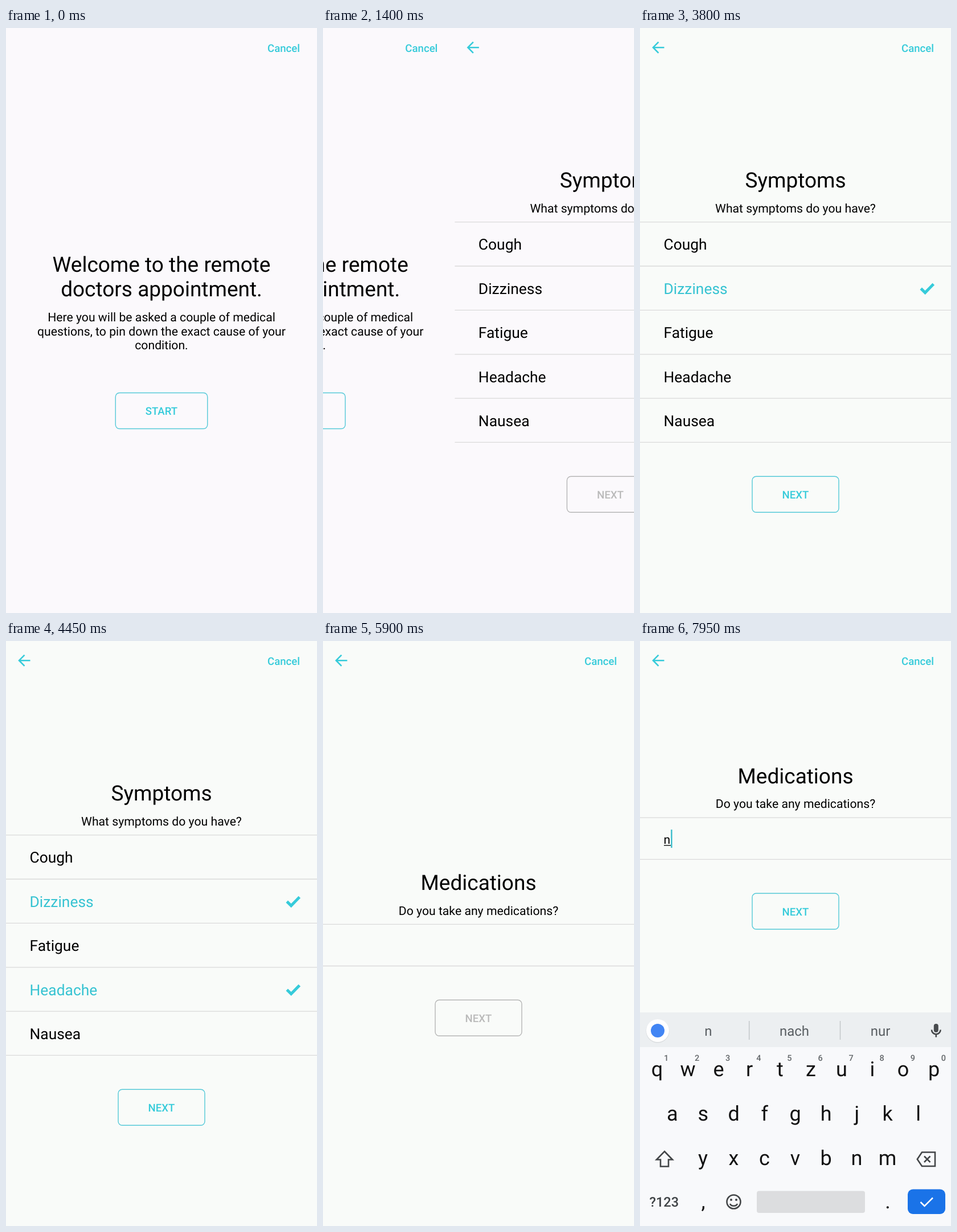
Animation, 546 px wide and 1027 px high, one loop 8000 ms. Source, as an HTML page:

```html
<!DOCTYPE html>
<html lang="en">
<head>
<meta charset="utf-8">
<title>Remote appointment</title>
<style>
  html, body { margin: 0; width: 100%; height: 100%; overflow: hidden; background: #fbf9fc; }
  svg { display: block; width: 100%; height: 100%; font-family: Roboto, "Open Sans", sans-serif; text-rendering: geometricPrecision; }
  .title { font-size: 37px; text-anchor: middle; }
  .sub { font-size: 21.2px; text-anchor: middle; }
  .item { font-size: 26.4px; }
  .bar, .btn text { font-size: 18.6px; font-weight: 500; }
  .bar { fill: #36cbda; }
  .arrow { fill: none; stroke: #36cbda; stroke-width: 2.6; }
  .rule { stroke: #dadada; stroke-width: 1.3; }
  .btn text { fill: #bababa; text-anchor: middle; }
  .btn rect { fill: none; stroke: #b6b6b6; stroke-width: 1.4; }
  .btn.on text { fill: #36cbda; }
  .btn.on rect { stroke: #55c9d8; }
  .tick { fill: none; stroke: #36cbda; stroke-width: 5; visibility: hidden; }
  .press { fill: #e6e8e6; visibility: hidden; }
  .row.down .press, .row.on .tick { visibility: inherit; }
  .row.on .item { fill: #36c3d2; }
  .keys { font-size: 36px; text-anchor: middle; fill: #111; }
  .digits { font-size: 14.5px; font-weight: 500; text-anchor: middle; fill: #63676a; }
  .words { font-size: 24px; text-anchor: middle; fill: #595e62; }
  .icon { fill: none; stroke: #434648; stroke-width: 2.6; }
</style>
</head>
<body>
<svg id="stage" viewBox="0 0 546 1027" preserveAspectRatio="none"></svg>
<script>
const LOOP = 8000, STEP = 50, WIDTH = 546;
const stage = document.getElementById('stage');

const text = (cls, x, y, s) => `<text class="${cls}" x="${x}" y="${y}">${s}</text>`;
const rule = y => `<path class="rule" d="M0 ${y}H546"/>`;
const cancel = text('bar', 459, 41.5, 'Cancel');
const back = '<path class="arrow" d="M42.5 34.2H24M32.5 24.6L23 34.2L32.5 43.8"/>';
const button = (id, y, w, label, cls = '') =>
  `<g id="${id}" class="btn ${cls}"><rect x="${273 - w / 2}" y="${y}" width="${w}" height="63" rx="7"/>` +
  text('', 273, y + 38.6, label) + '</g>';

const welcome = cancel +
  text('title', 273, 427.6, 'Welcome to the remote') +
  text('title', 273, 471.2, 'doctors appointment.') +
  text('sub', 273, 514.6, 'Here you will be asked a couple of medical') +
  text('sub', 273, 539.5, 'questions, to pin down the exact cause of your') +
  text('sub', 273, 564.4, 'condition.') +
  button('start', 640.5, 161.5, 'START', 'on');

const row = (name, i) => {
  const y = 340.6 + 77.4 * i;
  return `<g class="row" id="${name}"><rect class="press" y="${y}" width="546" height="77.4"/>` +
    rule(y) + text('item', 41.5, y + 48.8, name) +
    `<path class="tick" transform="translate(0 ${y})" d="M493.2 39.4l7.4 7.2L515.3 31.6"/></g>`;
};
const symptoms = back + cancel +
  text('title', 273, 280.2, 'Symptoms') +
  text('sub', 273, 323.6, 'What symptoms do you have?') +
  ['Cough', 'Dizziness', 'Fatigue', 'Headache', 'Nausea'].map(row).join('') + rule(727.4) +
  button('nextA', 787.2, 152, 'NEXT');

const medications = back + cancel + '<g id="form">' +
  text('title', 273, 437.2, 'Medications') +
  text('sub', 273, 480.6, 'Do you take any medications?') +
  rule(497.4) + rule(570.5) +
  '<g id="typed"><text x="41.5" y="543" font-size="21.25">n</text><path d="M42 546h12" stroke="#111" stroke-width="1.4"/></g>' +
  '<rect id="caret" y="518.3" width="2.4" height="32" fill="#3abccb"/>' +
  button('nextB', 630.2, 152, 'NEXT') + '</g>';

const letters = (s, x, y) => [...s].map((c, i) => text('', x + 54 * i, y, c)).join('');
const keyboard = `
  <rect y="652" width="546" height="375" fill="#f8f9fb"/>
  <rect y="652" width="546" height="61" fill="#eceff1"/>
  <circle cx="31" cy="685" r="20.5" fill="#d9dcde"/>
  <circle cx="31" cy="684" r="20" fill="#fff"/>
  <circle cx="31" cy="684" r="12" fill="#4285f4"/>
  <g id="words" class="words">
    <path d="M191.7 667V700M351.5 667V700" stroke="#c3c7ca" stroke-width="1.5"/>
    ${text('', 120, 693, 'n') + text('', 271, 693, 'nach') + text('', 422, 693, 'nur')}
  </g>
  <rect x="515.8" y="672" width="8" height="15" rx="4" fill="#484b4e"/>
  <path class="icon" d="M512 682.5a7.8 7.8 0 0 0 15.6 0M519.8 690.5V695.5"/>
  <rect id="keyDown" x="356" y="872" width="49" height="76" rx="6" fill="#e3e6e8"/>
  <g class="keys">
    ${letters('qwertzuiop', 30, 764) + letters('asdfghjkl', 56.7, 842) + letters('yxcvbnm', 110.5, 920)}
    ${text('', 111, 996, ',') + text('', 435, 996, '.')}
  </g>
  <g class="digits">${[...'1234567890'].map((c, i) => text('', 46 + 54.1 * i, 737, c)).join('')}</g>
  <text x="16.5" y="993" font-size="23.5" font-weight="500" fill="#3f4346">?123</text>
  <path class="icon" d="M43 896L57 910.5H50V922.5H36V910.5H29Z"/>
  <path class="icon" d="M495 897.5H518V922H495L486.8 909.8ZM499 904.5L509.5 915M509.5 904.5L499 915"/>
  <circle class="icon" cx="164.5" cy="984.5" r="12"/>
  <path class="icon" d="M158 988a7 6 0 0 0 13 0"/>
  <circle cx="160" cy="981" r="2" fill="#434648"/><circle cx="169" cy="981" r="2" fill="#434648"/>
  <rect x="205" y="965.5" width="190" height="38.5" rx="4" fill="#dcdddf"/>
  <rect x="470" y="962.5" width="66" height="43.5" rx="9" fill="#1a73e8"/>
  <path d="M492.5 985L499.5 992L514 977.5" fill="none" stroke="#fff" stroke-width="2.5"/>`;

stage.innerHTML = '<rect id="paper" width="546" height="1027"/>' +
  [welcome, symptoms, medications].map((s, i) => `<g id="page${i}">${s}</g>`).join('') +
  `<g id="keyboard">${keyboard}</g>`;

const el = {};
stage.querySelectorAll('[id]').forEach(n => el[n.id] = n);

const clamp = v => Math.min(1, Math.max(0, v));
const within = (t, a, b) => t >= a && t < b;
const show = (n, on) => n.setAttribute('visibility', on ? 'inherit' : 'hidden');
const move = (n, x, y) => n.setAttribute('transform', `translate(${x} ${y})`);

// Critically damped spring used for page pushes.
const spring = ms => {
  if (ms <= 0) return 0;
  if (ms >= 480) return 1;
  const k = 0.01826 * ms;
  return 1 - Math.exp(-k) * (1 + k);
};
const pressed = (t, from) =>
  t < from ? 1 : 1 - 0.7 * clamp((t - from + 50) / 100) * clamp((from + 300 - t) / 150);

function draw(t) {
  el.paper.setAttribute('fill', t < 2550 ? '#fbf9fc' : '#f9fbf9');

  const scroll = spring(t - 1294) + spring(t - 5300);
  for (let i = 0; i < 3; i++) {
    move(el['page' + i], (i - scroll) * WIDTH, 0);
    show(el['page' + i], Math.abs(i - scroll) < 1);
  }
  el.start.setAttribute('opacity', pressed(t, 1100));
  el.nextA.setAttribute('opacity', pressed(t, 5250));

  for (const [name, down, up] of [['Dizziness', 3050, 3200], ['Headache', 4050, 4200]]) {
    el[name].classList.toggle('down', within(t, down, up));
    el[name].classList.toggle('on', t >= up);
  }
  el.nextA.classList.toggle('on', t >= 3200);

  const typed = t >= 7800;
  const slide = clamp((t - 6540) / 300);
  move(el.form, 0, t >= 6650 ? -187.2 : 0);
  move(el.keyboard, 0, 375 * (1 - slide) ** 3);
  show(el.keyboard, slide > 0);
  show(el.typed, typed);
  show(el.caret, typed || (t >= 6300 && !within(t, 6800, 7300)));
  el.caret.setAttribute('x', typed ? 54.2 : 41.3);
  show(el.words, typed);
  show(el.keyDown, within(t, 7700, 7900));
  el.nextB.classList.toggle('on', typed);
}

// The picture advances at 20 steps per second.
const begin = performance.now();
function tick() {
  const t = (performance.now() - begin) % LOOP;
  draw(Math.floor((t + 2) / STEP) * STEP % LOOP);
  requestAnimationFrame(tick);
}
draw(0);
requestAnimationFrame(tick);
</script>
</body>
</html>
```
